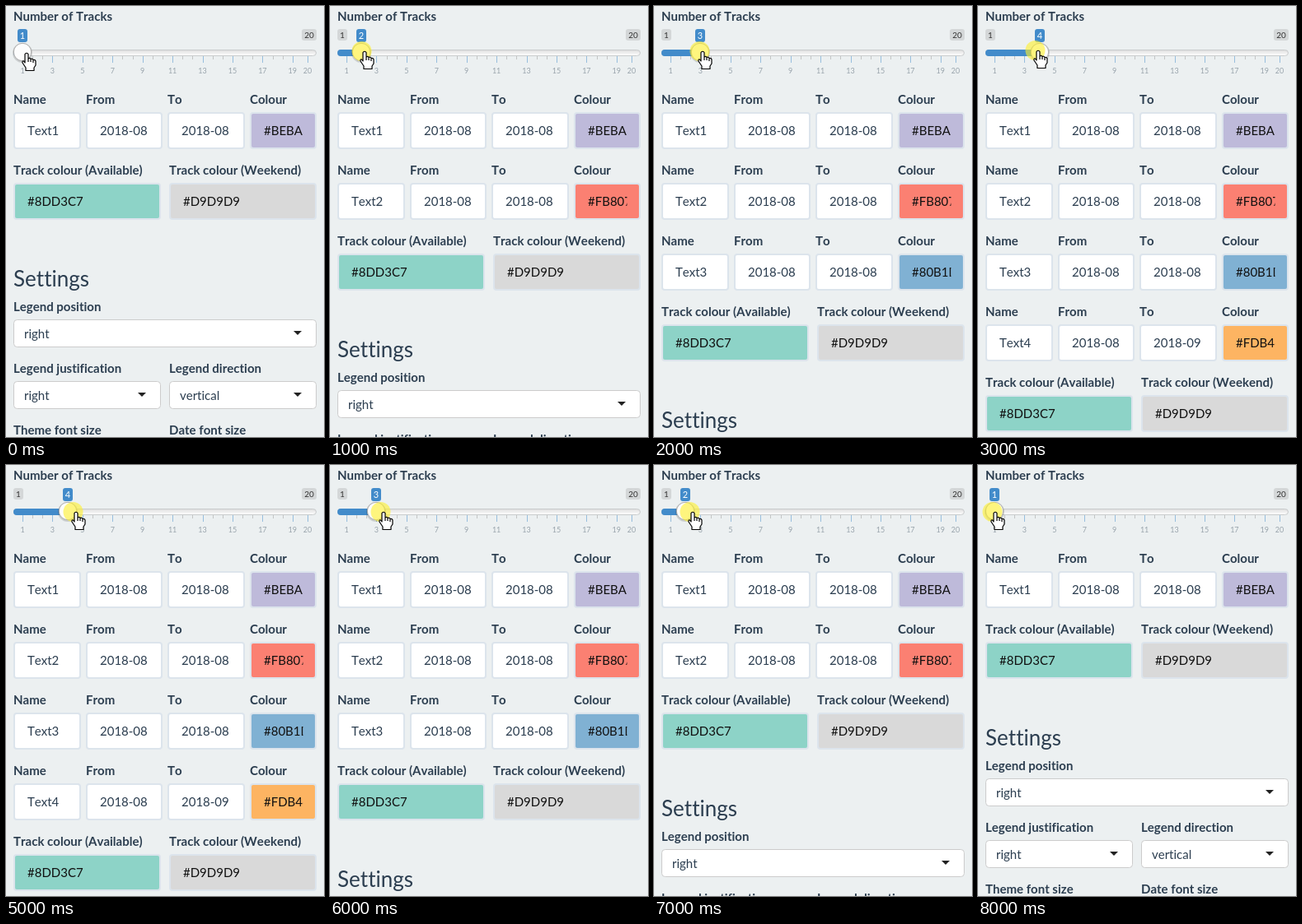
An HTML page for the animation above (9 s loop, 386 by 524 pixels).

```html
<!DOCTYPE html>
<html lang="en">
<head>
<meta charset="utf-8">
<title>Track settings</title>
<style>
html, body { margin: 0; width: 100%; height: 100%; overflow: hidden; background: #ecf0f1; }
svg { display: block; width: 386px; height: 524px; }
text {
  font: 15px Lato, sans-serif; fill: #2c3e50; white-space: pre;
  font-kerning: none; font-variant-ligatures: none;
}
.label { font-weight: 700; }
.heading { font-size: 26px; }
.ink { fill: #111; }
.grid { font-size: 9px; fill: #99a4ac; text-anchor: middle; }
.limit { font-size: 10px; fill: #333; text-anchor: middle; }
.value { font-size: 11px; fill: #fff; text-anchor: middle; }
</style>
</head>
<body>
<svg id="stage" viewBox="0 0 386 524">
  <defs>
    <linearGradient id="groove" x2="0" y2="1">
      <stop stop-color="#dedede"/><stop offset="1" stop-color="#fff"/>
    </linearGradient>
    <clipPath id="colourClip"><rect x="313" y="0" width="47.5" height="600"/></clipPath>
  </defs>
  <g id="slider"></g>
  <g id="tracks"></g>
  <g id="settings"></g>
  <g id="thumb">
    <rect x="-6" y="28" width="12" height="16" rx="3" fill="#428bca"/>
    <text id="value" class="value" y="40"></text>
    <circle cy="57" r="12" fill="#000" opacity=".14"/>
    <circle cy="56" r="10.7" fill="#fdfdfd" stroke="#ababab"/>
  </g>
  <circle id="glow" r="12" fill="#fff029" opacity=".6"/>
  <path id="hand" fill="#fff" stroke="#000" stroke-width="1.2" stroke-linejoin="round"
    d="M-2 1.5Q0-1 2 1.5V7Q4 5.5 5 7.5Q7 6.5 8 8.5Q10.5 8 11 10V15L9 18V21.500H-1V18L-5 12Q-5.500 9.500-3.500 10L-2 12ZM2 7V11M5 8V11M8 9V12"/>
</svg>
<script>
const $ = id => document.getElementById(id);
const ROW = 86, STEP_MS = 1000;
const colours = ['#BEBADA', '#FB8072', '#80B1D3', '#FDB462', '#B3DE69'];

// One entry per second: track count, pointer x, pointer y.
const steps = [
  [1, 25, 57], [2, 42, 55], [3, 59, 55], [4, 73, 54], [5, 94, 55],
  [4, 85, 57], [3, 65, 57], [2, 47, 57], [1, 21, 57]
];

const valueX = v => 20 + (v - 1) * 346 / 19;
const text = (x, y, s, cls = '', extra = '') =>
  `<text x="${x}" y="${y}" class="${cls}" ${extra}>${s}</text>`;
const rect = (x, y, w, h, fill, extra = '') =>
  `<rect x="${x}" y="${y}" width="${w}" height="${h}" fill="${fill}" ${extra}/>`;

function field(x, w, label, value, fill = '#fff', extra = '') {
  return text(x, 119, label, 'label') +
    rect(x + 1, 130, w - 2, 43, fill, 'rx="3" stroke="#dce4ec" stroke-width="2"') +
    text(x + 17, 157, value, fill === '#fff' ? '' : 'ink', extra);
}

function select(x, y, w, label, value) {
  const right = x + w - 23;
  return text(x, y, label, 'label') +
    rect(x + .5, y + 10.5, w - 1, 33, '#fff', 'rx="4" stroke="#ccc"') +
    text(x + 13, y + 33, value) +
    `<path d="M${right - 5} ${y + 24}h10l-5 5z" fill="#222"/>`;
}

function trackRow(colour, i) {
  return `<g transform="translate(0 ${i * ROW})">` +
    field(9, 82, 'Name', 'Text' + (i + 1)) +
    field(97, 93, 'From', '2018-08') +
    field(196, 94, 'To', i < 3 ? '2018-08' : '2018-09') +
    field(296, 81, 'Colour', colour, colour, 'clip-path="url(#colourClip)"') + '</g>';
}

function sliderBase() {
  const tick = (v, h, fill) => rect(Math.round(valueX(v)), 61, 1, h, fill, 'opacity=".5"');
  let s = text(9, 18, 'Number of Tracks', 'label') +
    rect(9.5, 53.5, 367, 7, 'url(#groove)', 'rx="4" stroke="#c8cbcc"') +
    '<path id="bar" fill="#428bca"/>' +
    rect(359, 28, 18, 14, '#000', 'rx="3" opacity=".1"') + text(368, 39, 20, 'limit') +
    '<g id="minimum">' + rect(9, 28, 12, 14, '#000', 'rx="3" opacity=".1"') +
    text(15, 39, 1, 'limit') + '</g>';
  for (const v of [1, 3, 5, 7, 9, 11, 13, 15, 17, 19, 20]) {
    s += tick(v, 8, '#428bca') + text(valueX(v), 82, v, 'grid');
    if (v < 19) s += tick(v + 2 / 3, 4, '#999') + tick(v + 4 / 3, 4, '#999');
  }
  return s;
}

$('slider').innerHTML = sliderBase();
$('tracks').innerHTML = colours.map(trackRow).join('');
// Laid out for zero rows plus one: each visible row pushes it down by ROW.
$('settings').innerHTML =
  field(9, 179, 'Track colour (Available)', '#8DD3C7', '#8DD3C7') +
  field(198, 179, 'Track colour (Weekend)', '#D9D9D9', '#D9D9D9') +
  text(9, 341 - ROW, 'Settings', 'heading') +
  select(9, 371 - ROW, 368, 'Legend position', 'right') +
  select(9, 446 - ROW, 179, 'Legend justification', 'right') +
  select(198, 446 - ROW, 179, 'Legend direction', 'vertical') +
  text(9, 521 - ROW, 'Theme font size', 'label') +
  text(198, 521 - ROW, 'Date font size', 'label');

const rows = [...$('tracks').children];
const show = (el, on) => el.setAttribute('display', on ? 'inline' : 'none');
const move = (id, x, y) => $(id).setAttribute('transform', `translate(${x} ${y})`);

function render(time) {
  const index = Math.floor(time / STEP_MS) % steps.length;
  const [count, x, y] = steps[index];
  const thumbX = Math.round(valueX(count));
  rows.forEach((row, i) => show(row, i < count));
  show($('minimum'), count > 1);
  show($('glow'), index > 0);
  $('value').textContent = count;
  $('bar').setAttribute('d', `M${thumbX} 53H13a4 4 0 0 0 0 8H${thumbX}z`);
  move('settings', 0, count * ROW);
  move('thumb', thumbX, 0);
  move('glow', x - 3.5, y);
  move('hand', x, y);
}

const start = performance.now();
function tick() {
  render(performance.now() - start);
  requestAnimationFrame(tick);
}
tick();
</script>
</body>
</html>
```
